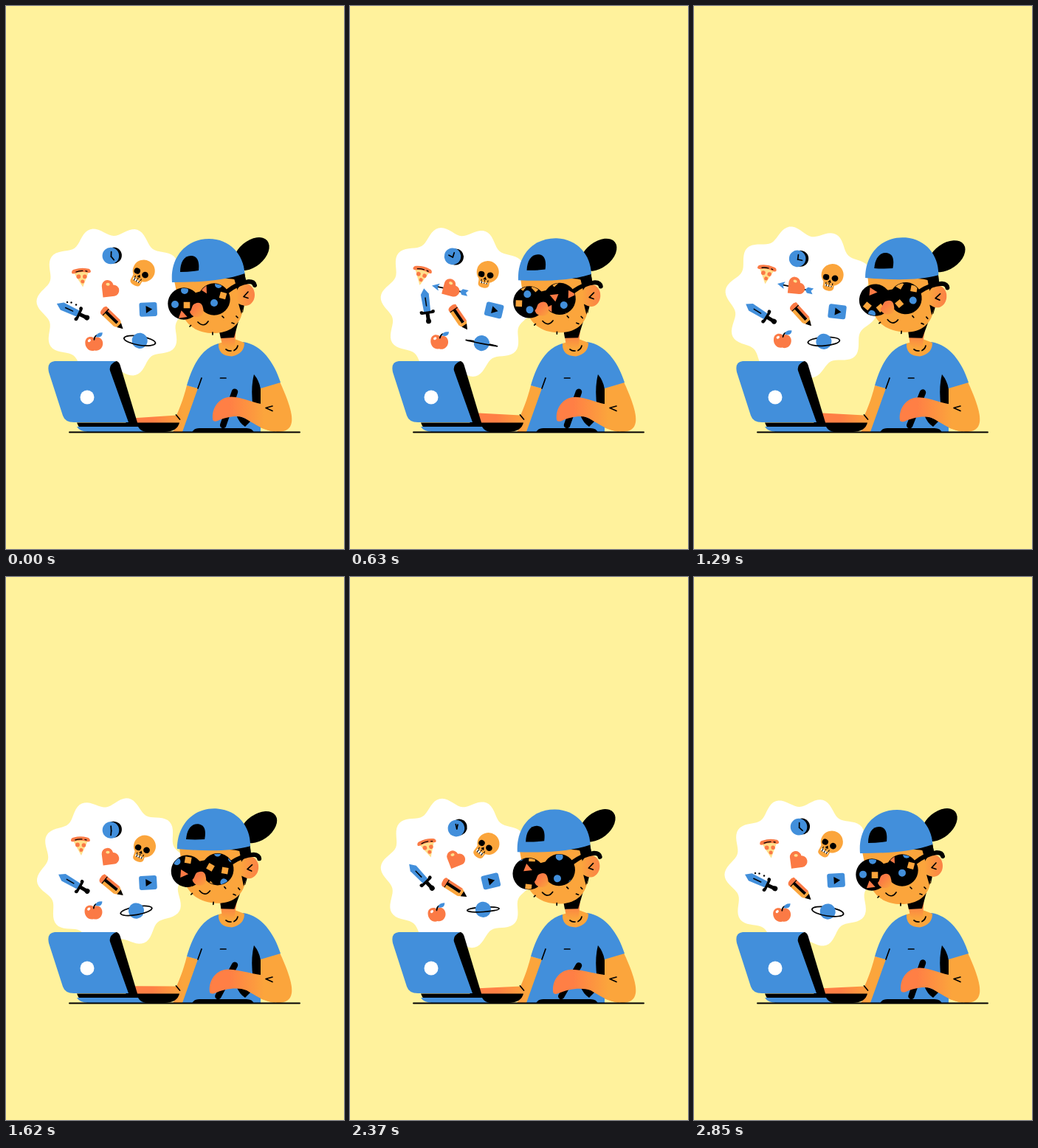
Recreate the animation shown at these times as an HTML page. Size 458 by 737 pixels, loop 2880 ms.

```html
<!DOCTYPE html>
<html lang="en">
<head>
<meta charset="utf-8">
<title>Day dreaming at the desk</title>
<style>
html, body { margin: 0; width: 100%; height: 100%; overflow: hidden; background: #fff29c; }
svg { display: block; width: 100vw; height: 100vh; }
.blue { fill: #428fdb; }
.orange { fill: #fba53c; }
.coral { fill: #fb7a45; }
.cream { fill: #ffe08c; }
.white { fill: #fff; }
.line { fill: none; stroke: #000; stroke-linecap: round; stroke-linejoin: round; }
</style>
</head>
<body>
<svg viewBox="0 0 458 737" stroke-width="1.7" xmlns="http://www.w3.org/2000/svg">
  <defs>
    <linearGradient id="handTone" gradientUnits="userSpaceOnUse" x1="282" y1="0" x2="350" y2="0">
      <stop offset=".3" stop-color="#ff7f45"/><stop offset="1" stop-color="#fba53c"/>
    </linearGradient>
    <linearGradient id="armTone" gradientUnits="userSpaceOnUse" x1="180" y1="0" x2="240" y2="0">
      <stop offset=".3" stop-color="#ff7f45"/><stop offset="1" stop-color="#fba53c"/>
    </linearGradient>
    <linearGradient id="noseTone" x1="0" y1="0" x2="1" y2="1">
      <stop offset=".35" stop-color="#fb7a45"/><stop offset="1" stop-color="#fba53c"/>
    </linearGradient>
    <linearGradient id="earTone" x1="0" y1="0" x2="1" y2="0">
      <stop offset="0" stop-color="#fba53c"/><stop offset="1" stop-color="#fb8146"/>
    </linearGradient>
    <linearGradient id="neckTone" x1="0" y1="0" x2="0" y2="1">
      <stop offset=".4" stop-color="#fb7f45"/><stop offset="1" stop-color="#fba53c"/>
    </linearGradient>
    <clipPath id="lensClip"><circle r="21"/></clipPath>
  </defs>

  <path id="bubble" class="white"/>

  <g id="clock">
    <circle cx="3.4" cy="-.6" r="11"/>
    <circle cx="-.6" r="11.3" class="blue"/>
    <path class="line" d="M0 1V-5.5"/>
    <path class="line" id="minute" d="M0 1H6"/>
  </g>

  <g id="pizza">
    <path class="cream" d="M-10-7Q0-10 10-7L1 13Z"/>
    <path class="coral" d="M-13-7Q-13-11-9-11.5Q0-14 9-11.5Q13-11 13-7Q12-5 9-6Q0-9-9-6Q-12-5-13-7Z"/>
    <path class="line" stroke-width="1.3" d="M-7-8Q-3-9.4 2-9M6-8.5L8-8"/>
    <g class="coral"><circle cx="-4" cy="-1.5" r="2.9"/><circle cx="4.500" cy="-1" r="2.8"/><circle cx="1" cy="5.500" r="2.5"/></g>
  </g>

  <g id="skull">
    <g id="jaw">
      <path class="orange" d="M-9 9H6V17Q5 21-1 21Q-9 21-9 16Z"/>
      <path class="white" d="M-6.500 11H4V15H-6.500Z"/>
      <path class="line" stroke-width="1.1" d="M-4.500 11V15M-1 11V15M2.500 11V15"/>
    </g>
    <circle class="orange" cx="1" cy="-1" r="15"/>
    <path class="orange" d="M-9 6H7V12H-9Z"/>
    <ellipse cx="-6.800" cy="3.500" rx="4.200" ry="4"/><ellipse cx="5.200" cy="3" rx="4.400" ry="4.200"/>
    <path d="M-1 6L1.500 10H-3.500Z"/>
    <path class="line" stroke-width="1.1" d="M-5.500 10.500V12.500M-1 11V12.500M3.500 10.500V12.500"/>
  </g>

  <g id="heart">
    <g id="arrow">
      <path class="line" d="M-17 0H18"/>
      <path class="blue" d="M-24 0L-14-5L-16 0L-14 5ZM15 0L18-4H26L23 0L26 4H18Z"/>
    </g>
    <g id="heartBody">
      <path class="coral" d="M0 12L-11 1A7.800 7.800 0 0 1 0-10A7.800 7.800 0 0 1 11 1Z"/>
      <ellipse class="cream" cx="-6" cy="-6" rx="2.600" ry="1.900" transform="rotate(-35 -6 -6)"/>
    </g>
  </g>

  <g id="video">
    <rect class="blue" x="-12" y="-9.500" width="24" height="19" rx="3"/>
    <path d="M-3-5L5.500 0L-3 5Z"/>
  </g>

  <g id="sword">
    <path class="blue" d="M-44 0L-36-5.500L-12-4.500V4.500L-36 5.500Z"/>
    <path class="line" stroke-width="1.5" d="M-31 0H-20"/>
    <path d="M-13-10Q-9-11-9-7V-2.500H0V2.500H-9V7Q-9 11-13 10Q-15 8-12.500 5V-5Q-15-8-13-10Z"/>
    <circle cx="1" r="3.500"/>
  </g>
  <g id="sparks"><circle cx="83" cy="402" r="1.200"/><circle cx="88.500" cy="402.500" r="1.200"/><circle cx="95" cy="405.500" r="1.200"/></g>

  <g id="pencil">
    <path class="coral" d="M-37-6.200H-10V-2H-37Z"/>
    <path d="M-37-2.500H-10V2H-37Z"/>
    <path class="orange" d="M-35 1.500H-10V6.200H-35Z"/>
    <path class="coral" d="M-36-6.200Q-39-4-38 0Q-38 5-35 6.200H-32V-6.200Z"/>
    <path class="line" stroke-width="1.2" d="M-31.500-5.500V5.500"/>
    <path class="orange" d="M-10-6.200L0 0L-10 6.200Z"/>
    <path d="M-6.500-4L1 0L-6.500 4Z"/>
  </g>

  <g id="apple">
    <path class="coral" d="M0-6C5-10 12-6 12 1C12 8 6 12 1 10.500C-5 13-12 8-12 0C-12-7-5-9.500 0-6Z"/>
    <path class="line" d="M0-4Q0-8 3-10"/>
    <path class="blue" d="M2-8Q3-14 11-14Q11-6 2-8Z"/>
    <ellipse class="white" cx="-6.500" cy="-2.500" rx="2.300" ry="1.700" transform="rotate(-40 -6.500 -2.500)"/>
  </g>

  <g id="planet">
    <path class="line" id="ringBack"/>
    <circle class="blue" r="10.600"/>
    <path class="line" id="ringFront"/>
  </g>

  <path id="leftArm" fill="url(#armTone)"/>
  <path class="line" d="M230.500 555L235.500 561"/>

  <path class="orange" d="M345 518L371 510C380 530 389 552 387 565Q385 578 368 578C352 576 340 571 334 566Z"/>
  <path class="blue" d="M288 458C266 464 253 486 245 515L260 519L239 578H345V519L372 511C364 485 347 460 322 456Z"/>
  <path d="M336 500Q343 508 345 520L345 550L335 546Q331 520 336 500Z"/>
  <path class="line" d="M265 505L260 519M290.500 505H298"/>
  <path class="orange" d="M288 458Q287 475 306 475.500Q323 472 323 457L310 452Z"/>

  <path d="M252 579Q254 573 262 573H326Q334 573 336 579Z"/>
  <path class="line" id="pen" stroke-width="8.5"/>
  <path d="M312 555L332 563L324 571Q316 566 312 555Z"/>
  <path id="hand" fill="url(#handTone)"/>
  <path class="line" d="M361 543L352 545.500L361 549.500"/>

  <path d="M149 482Q152.500 482 154.500 487L178.500 567H163L139 492Q140 484 149 482Z"/>
  <path class="blue" d="M66 482H149Q139 487 141 495L166 565H92Q80 565 77 556L58 497Q55 483 66 482Z"/>
  <path d="M96 565.500H235Q232 578 214 578H112Q99 576 96 565.500Z"/>
  <path class="blue" d="M96 571H179Q182 577 190 578H112Q100 578 96 571Z"/>
  <circle class="white" cx="110" cy="531" r="9.500"/>
  <path class="line" stroke-width="1.900" d="M86 578.500H398"/>

  <g id="head">
    <path fill="url(#neckTone)" d="M288 436L312 434L310 460Q304 468 293 460Z"/>
    <path d="M288 437L315 428L309 450L291 451Z"/>
    <ellipse cx="332.500" cy="336.500" rx="28" ry="17.500" transform="rotate(-40 332.500 336.500)"/>
    <path d="M300 364L323 362L327 384L321 416L310 412Z"/>
    <path class="orange" d="M228 373L308 366L316 395L321 410C319 434 302 444 281 444C258 444 243 433 236 412Z"/>
    <path d="M296 370L323 362L326 377Q312 369 296 370Z"/>
    <path d="M315 404L322 407L319 418Z"/>
    <ellipse cx="324.500" cy="392" rx="12.500" ry="15" fill="url(#earTone)"/>
    <path class="line" d="M328 388L322 394.500L328 396.500"/>
    <path class="blue" d="M225 375C222 340 245 316 275 316C303 316 322 337 323.500 363C296 373 262 375 225 375Z"/>
    <path d="M236 361C236 347 242 338 252 339C261 340 262 350 261 359Q248 361 236 361Z"/>
    <path class="line" stroke-width="6" d="M299 388Q314 376 329 374Q336 374 337 379"/>
    <path class="line" d="M260 429Q268 437 274 428M249 435L250.500 433.500M280 443V446M293 421L295 423M306 430L309 431M312 421L314 423"/>
    <path d="M250 391L268 386V406H252Z"/>
    <g id="lensLeft" transform="translate(241 404)"><circle r="21.700"/></g>
    <g id="lensRight" transform="translate(282 398)"><circle r="21.700"/></g>
    <path fill="url(#noseTone)" d="M256 404Q265 400 267 410Q270 421 260 422Q251 422 249 415Q251 413 252 409Q253 405 256 404Z"/>
  </g>
  <path class="line" d="M298 466Q301 468.500 305 468M309 467.500Q313 465.500 314 461"/>
</svg>

<script>
const LOOP = 2880, STEP = 30, TAU = Math.PI * 2;
const $ = id => document.getElementById(id);
const osc = (t, mean, amp, peak, turns = 1) =>
  mean + amp * Math.cos(TAU * turns * (t - peak) / LOOP);
const ease = p => (1 - Math.cos(Math.PI * Math.min(1, Math.max(0, p)))) / 2;

function keyed(t, keys) {
  const i = keys.findIndex(k => k[0] > t);
  const [t0, v0] = keys[i - 1], [t1, v1] = keys[i];
  return v0 + (v1 - v0) * ease((t - t0) / (t1 - t0));
}

// Each value: [mean, amplitude, time of the peak]
const icons = {
  clock:  { x: [142, 2.6, 2240], y: [341.2, 2.3, 1600], a: [2, 16, 720] },
  pizza:  { x: [100.7, 5, 2320], y: [366.5, 2.2, 2700], a: [1, 14, 870] },
  skull:  { x: [186, .7, 1700], y: [363, 3.2, 1540], a: [22, 15, 2390] },
  heart:  { x: [138.2, 4, 2250], y: [384, 2.2, 0], a: [0, 0, 0] },
  video:  { x: [193, 2.3, 780], y: [413.4, 1.6, 1500], a: [0, 14, 800] },
  sword:  { x: [108.5, 2.2, 2200], y: [424.8, 3.3, 1050], a: null },
  pencil: { x: [158, .5, 900], y: [435, 4, 400], a: [44, 12, 720] },
  apple:  { x: [119.3, 2, 720], y: [455, 2, 2700], a: [4, 5, 900] },
  planet: { x: [178.6, 2.7, 2750], y: [454.3, 3.3, 720], a: [1, 12, 380] }
};
const swordSwing = [[0, 25], [650, 82], [1440, 27], [2200, 50], [LOOP + 1, 25]];
const ringTilt = [[0, 6], [640, .6], [960, 6], [1620, 5.5], [2220, 2.8], [LOOP + 1, 6]];

// Reflections: [shape, x, y, angle]
const shapes = {
  dot: ['blue', 'M-5 0A5 5 0 1 1 5 0A5 5 0 1 1-5 0Z'],
  box: ['orange', 'M-4.3-4.3H4.3V4.3H-4.3Z'],
  tri: ['coral', 'M-4.5-5.5L6 0L-4.5 5.5Z']
};
const reflections = {
  lensLeft: [
    ['dot', -12, 1, 0], ['box', 4, 2, 0], ['tri', -1, 16, 20], ['dot', 1, -18, 0],
    ['box', -14, -26, 0], ['dot', -3, -39, 0], ['box', -10, -49, 35], ['box', 8, -48, 45],
    ['tri', -4, -69, 0], ['box', 0, -88, 5], ['dot', -15, -85, 0]
  ],
  lensRight: [
    ['dot', 0, 5, 0], ['tri', -13, -13, 60], ['box', 12, -5, 15], ['dot', 6, -20, 0],
    ['tri', -8, -31, 200], ['tri', 16, -35, 0], ['box', -8, -50, 45], ['dot', 10, -56, 0],
    ['box', -10, -75, 25], ['box', 10, -72, 5], ['dot', -2, -95, 0], ['dot', 18, -89, 0]
  ]
};
const SCROLL = LOOP * .045;

function add(parent, tag, attrs) {
  const el = document.createElementNS('http://www.w3.org/2000/svg', tag);
  for (const key in attrs) el.setAttribute(key, attrs[key]);
  return parent.appendChild(el);
}

const floaters = [];
for (const lens in reflections) {
  const glass = add($(lens), 'g', { 'clip-path': 'url(#lensClip)' });
  for (const [kind, x, y, angle] of reflections[lens]) {
    const [tone, d] = shapes[kind];
    floaters.push({ el: add(glass, 'path', { class: tone, d }), x, y, angle });
  }
}

const outline = Array.from({ length: 180 }, (_, i) => {
  const a = i * TAU / 180, r = 96.8 + 6.8 * Math.cos(10 * a);
  return (r * Math.cos(a)).toFixed(2) + ' ' + (r * Math.sin(a)).toFixed(2);
});
$('bubble').setAttribute('d', 'M' + outline.join('L') + 'Z');

const transform = (id, value) => $(id).setAttribute('transform', value);

function drawIcons(t) {
  for (const id in icons) {
    const { x, y, a } = icons[id];
    const angle = a ? osc(t, ...a) : keyed(t, swordSwing);
    transform(id, `translate(${osc(t, ...x)} ${osc(t, ...y)}) rotate(${angle})`);
  }
  transform('minute', `rotate(${50 + t * 720 / LOOP - osc(t, ...icons.clock.a)} 0 1)`);
  transform('jaw', `translate(0 ${osc(t, 1, 1, 2390)})`);
  transform('heartBody', `rotate(${osc(t, 42, 19, 800)})`);
  const reach = ease((t - 250) / 330) * (1 - ease((t - 1250) / 600));
  transform('arrow', `rotate(12) scale(${reach})`);
  $('sparks').style.display = t < 150 || t > 2650 ? '' : 'none';
  const ry = keyed(t, ringTilt);
  $('ringBack').setAttribute('d', `M-21.5 0A21.5 ${ry} 0 0 1 21.5 0`);
  $('ringFront').setAttribute('d', `M-21.5 0A21.5 ${ry} 0 0 0 21.5 0`);
}

function drawPerson(t) {
  transform('head', `rotate(${osc(t, 2.5, 2.5, 1420)} 300 455)`);
  for (const { el, x, y, angle } of floaters) {
    const drop = (y + t * .045 + SCROLL * 1.5) % SCROLL - SCROLL / 2;
    el.setAttribute('transform', `translate(${x} ${drop}) rotate(${angle})`);
  }
  // The drawing hand sways four times per loop, the typing hand taps twelve times.
  const q = osc(t, .5, .5, 320, 4);
  const dx = -6.5 * q, dy = 3 * q;
  const at = (x, y) => `${x + dx} ${y + dy}`;
  $('hand').setAttribute('d',
    `M${at(280.5, 562)}C${at(278, 545)} ${at(290, 530)} ${at(306, 530.5)}` +
    `C${at(322, 531)} 336 540 353 541L372 560L364 578C350 576 338 568 326 561` +
    `C${at(318, 554)} ${at(300, 557)} ${at(287, 563)}Q${at(282, 564.5)} ${at(280.5, 562)}Z`);
  $('pen').setAttribute('d', `M310 ${523.5 + 5 * q}L${294.5 - 10.5 * q} 569`);
  const tap = osc(t, 555.3, 4, 0, 12);
  $('leftArm').setAttribute('d',
    `M245 515C240 535 234 549 231 555.5L174 ${tap}V567H234L226 578H240L261 519Z`);
}

function frame(now) {
  const t = Math.floor(now % LOOP / STEP) * STEP;
  transform('bubble', `translate(145 402) rotate(${-71.4 + t * 180 / LOOP})`);
  drawIcons(t);
  drawPerson(t);
}

let start;
function tick(now) {
  start ??= now;
  frame(now - start);
  requestAnimationFrame(tick);
}
frame(0);
requestAnimationFrame(tick);
</script>
</body>
</html>
```
